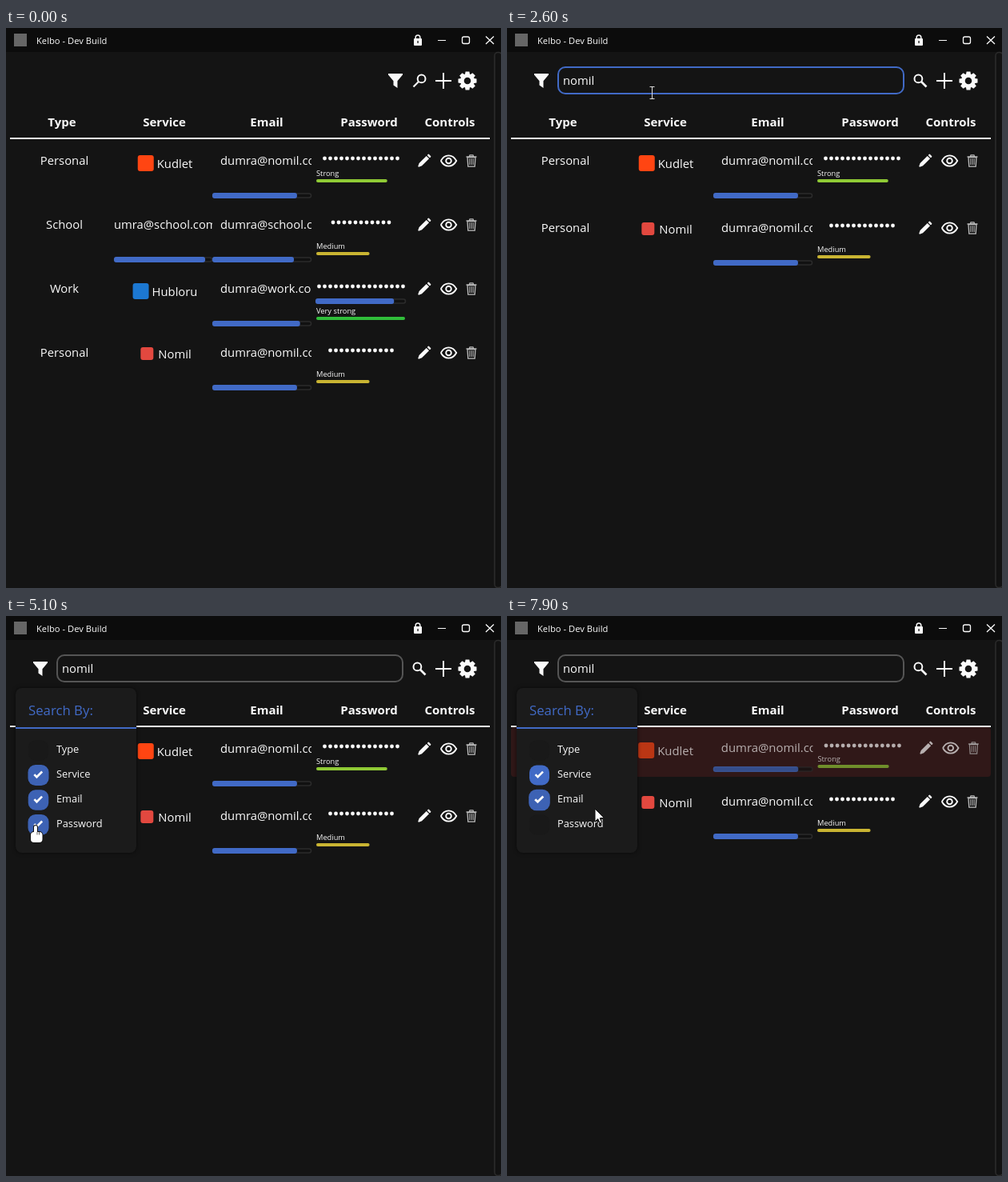
Animation, 619 px wide and 700 px high, one loop 8000 ms. Source, as an HTML page with a canvas:

```html
<!DOCTYPE html>
<html lang="en">
<head>
<meta charset="utf-8">
<title>Password manager</title>
<style>
html, body { margin: 0; width: 100%; height: 100%; overflow: hidden; background: #141414; }
canvas { display: block; }
</style>
</head>
<body>
<canvas id="stage" width="619" height="700"></canvas>
<script>
const ctx = document.getElementById('stage').getContext('2d');
const LOOP = 8000, STEP = 100;
const WHITE = '#fafafa', BLUE = '#416ac6', BG = '#141414';
const BODY = 14.8, PITCH = 7;
const QUERY = 'nomil';

const levels = {
  'Medium': { color: '#c9b432', share: 0.6 },
  'Strong': { color: '#8fca35', share: 0.8 },
  'Very strong': { color: '#30bd3a', share: 1 }
};
const rows = [
  { type: 'Personal', service: 'Kudlet', icon: '#ff4512', size: 20, mail: 'dumra@nomil.com', dots: 14, level: 'Strong', ly: 43 },
  { type: 'School', link: 'umra@school.com', mail: 'dumra@school.com', dots: 11, level: 'Medium', ly: 54 },
  { type: 'Work', service: 'Hubloru', icon: '#1c78d2', size: 20, mail: 'dumra@work.com', dots: 17, level: 'Very strong', ly: 55 },
  { type: 'Personal', service: 'Nomil', icon: '#e2483f', size: 16, mail: 'dumra@nomil.com', dots: 12, level: 'Medium', ly: 54 }
];
const filters = [
  { name: 'Type', off: 4400 },
  { name: 'Service' },
  { name: 'Email', off: 5450, on: 7400 },
  { name: 'Password', off: 5150 }
];

// each move eases to a point between two times; bow bends it downwards
const moves = [
  { from: 100, to: 400, x: 515, y: 65 },
  { from: 600, to: 1100, x: 181, y: 81, bow: 55 },
  { from: 2800, to: 3200, x: 43, y: 65 },
  { from: 3300, to: 3700, x: 41, y: 160 },
  { from: 3700, to: 4100, x: 40, y: 222 },
  { from: 4100, to: 4300, x: 40, y: 163 },
  { from: 4700, to: 5100, x: 37, y: 262 },
  { from: 5300, to: 5500, x: 40, y: 225 },
  { from: 5900, to: 6100, x: 67, y: 246 },
  { from: 6500, to: 7000, x: 225, y: 185 },
  { from: 7000, to: 7400, x: 41, y: 225 },
  { from: 7700, to: 7900, x: 110, y: 241 }
];

const clamp = v => Math.max(0, Math.min(1, v));
const ramp = (t, start, span) => clamp((t - start) / span);
const ease = p => p * p * (3 - 2 * p);

function pointer(t) {
  if (t < moves[0].from) return null;
  let x = 597, y = 107;
  for (const m of moves) {
    const p = ease(ramp(t, m.from, m.to - m.from));
    x += (m.x - x) * p;
    y += (m.y - y) * p + (m.bow || 0) * Math.sin(Math.PI * p);
    if (p < 1) break;
  }
  return { x, y };
}

function setFont(size, weight) {
  ctx.font = `${weight || (size < 12 ? 500 : 400)} ${size}px "Open Sans", "Noto Sans", sans-serif`;
}

function widthOf(s) {
  setFont(BODY);
  return ctx.measureText(s).width;
}

function text(s, x, cy, size = BODY, { weight, align = 'left', color = WHITE } = {}) {
  setFont(size, weight);
  ctx.textAlign = align;
  ctx.fillStyle = color;
  ctx.fillText(s, x, Math.round(cy + size * 0.36));
}

function paint(fill, stroke, lw = 1) {
  if (fill) { ctx.fillStyle = fill; ctx.fill(); }
  if (stroke) { ctx.strokeStyle = stroke; ctx.lineWidth = lw; ctx.stroke(); }
}

function box(x, y, w, h, r, fill, stroke, lw) {
  ctx.beginPath();
  ctx.roundRect(x, y, w, h, r);
  paint(fill, stroke, lw);
}

function circle(x, y, r, fill, stroke, lw) {
  ctx.beginPath();
  ctx.arc(x, y, r, 0, 7);
  paint(fill, stroke, lw);
}

function poly(points, fill, stroke, lw) {
  ctx.beginPath();
  points.forEach(([x, y]) => ctx.lineTo(x, y));
  ctx.closePath();
  paint(fill, stroke, lw);
}

function line(color, lw, ...points) {
  ctx.beginPath();
  points.forEach(([x, y]) => ctx.lineTo(x, y));
  paint(null, color, lw);
}

// the same half outline on both sides of the vertical axis
const mirror = half => [...half, ...half.map(([x, y]) => [-x, y]).reverse()];

function at(x, y, draw) {
  ctx.save();
  ctx.translate(x, y);
  draw();
  ctx.restore();
}

function clipped(x, y, w, h, draw) {
  ctx.save();
  ctx.beginPath();
  ctx.rect(x, y, w, h);
  ctx.clip();
  draw();
  ctx.restore();
}

function titleBar() {
  box(0, 0, 619, 30, 0, '#0c0c0c');
  box(10, 7, 16, 16, 0, '#666');
  text('Kelbo - Dev Build', 38, 15.5, 11.2);
  box(510, 13, 10, 9, 1, WHITE);
  box(512.2, 9, 5.6, 8, 2.8, null, WHITE, 1.5);
  box(514.4, 16, 1.3, 3, 0, '#111');
  line(WHITE, 1, [540, 15.5], [550, 15.5]);
  box(570.5, 11, 9, 8.5, 2, null, WHITE, 1.3);
  line(WHITE, 1.3, [600, 10.5], [610, 20]);
  line(WHITE, 1.3, [610, 10.5], [600, 20]);
}

function gear() {
  for (let i = 0; i < 8; i++) {
    poly(mirror([[3.2, -7], [2.4, -11.5]]), WHITE);
    ctx.rotate(Math.PI / 4);
  }
  circle(0, 0, 6.6, null, WHITE, 4.6);
}

function funnel() {
  poly([[-9, -9], [9, -9], [9, -7.6], [2.5, 0.3], [2.5, 9], [-2.5, 5.6], [-2.5, 0.3], [-9, -7.6]], WHITE);
}

function searchField(t, left) {
  const focused = t < 3300;
  box(left, 49, 496 - left, 33, 9, BG, focused ? BLUE : '#555', 2);
  const typed = QUERY.slice(0, Math.max(0, Math.floor((t - 1700) / 75)));
  text(typed, 70, 66);
  const idle = t - (t >= 2100 ? 2100 : t >= 1800 ? 1800 : 1000);
  if (focused && idle >= 0 && idle % 1000 < 500) {
    box(70 + Math.round(widthOf(typed)), 55, 1, 21, 0, WHITE);
  }
}

function toolbar(t) {
  const p = ease(ramp(t, 500, 500)), fx = 487 - 444 * p;
  at(fx, 66, funnel);
  if (p > 0.02) searchField(t, fx + 21);
  at(517, 66, () => {
    ctx.rotate((1 - p) * Math.PI / 2);
    circle(-2.6, -2.6, 4.9, null, WHITE, 2);
    line(WHITE, 2.2 + 0.5 * p, [1, 1], [7.5, 7.5]);
  });
  line(WHITE, 2, [537, 66], [557, 66]);
  line(WHITE, 2, [547, 56], [547, 76]);
  at(577, 66, gear);
}

function tableHead() {
  ['Type', 'Service', 'Email', 'Password'].forEach((name, i) =>
    text(name, 70 + 128 * i, 118, 15, { weight: 700, align: 'center' }));
  text('Controls', 555, 118, 15, { weight: 700, align: 'center' });
  box(5, 137, 600, 2, 0, WHITE);
}

function scrollBar(x, cy, w, content) {
  box(x + 0.5, cy - 2.5, w - 1, 5, 3, '#111', '#2b2b2b', 1.5);
  box(x, cy - 3.5, w * w / content, 7, 3, BLUE);
}

function pencil() {
  ctx.rotate(Math.PI / 4);
  box(-2.4, -10, 4.8, 2.6, 1, WHITE);
  poly(mirror([[2.4, -6.2], [2.4, 6.6], [0.6, 10.4]]), WHITE);
}

function eye() {
  ctx.beginPath();
  ctx.moveTo(-9.7, 0);
  ctx.bezierCurveTo(-5, -8.8, 5, -8.8, 9.7, 0);
  ctx.bezierCurveTo(5, 8.8, -5, 8.8, -9.7, 0);
  paint(null, WHITE, 1.9);
  circle(0, 0, 3.3, null, WHITE, 1.9);
}

function bin() {
  const gray = '#bdbdbd';
  line(gray, 1.3, [-6.5, -5], [6.5, -5]);
  box(-2.3, -7.2, 4.6, 2.2, 0.5, null, gray, 1.2);
  poly(mirror([[5, -4.5], [4.2, 7.2]]), null, gray, 1.3);
  for (const x of [-2.2, 0, 2.2]) line(gray, 1, [x, -2.8], [x, 5]);
}

function serviceCell(r, top, h, bar, lift) {
  if (r.link) {
    clipped(135, top, 123, h, () => text(r.link, 135, top + 27 - lift));
    scrollBar(135, bar, 123, widthOf(r.link) + 4);
    return;
  }
  const x = 199 - (widthOf(r.service) + 24) / 2, cy = top + 21 + r.size / 2 - lift;
  box(x + 10 - r.size / 2, cy - 1 - r.size / 2, r.size, r.size, 3, r.icon);
  text(r.service, x + 24, cy);
}

function passwordCell(r, top, h, lift) {
  const ly = top + Math.min(r.ly, h - 22), span = r.dots * PITCH, wide = span > 112;
  if (!wide || !lift) {
    clipped(388, top, 112, h, () => {
      const x = wide ? 388 : 444 - span / 2;
      for (let i = 0; i < r.dots; i++) circle(x + (i + 0.5) * PITCH, top + 24 - lift, 2.4, WHITE);
    });
  }
  if (wide) scrollBar(387, ly - 12.5, 113, span + 11);
  const { color, share } = levels[r.level];
  text(r.level, 388, ly, 9.3);
  box(388, ly + 7, 111 * share, 4, 2, color);
}

function drawRow(r, top, h, p, hovered) {
  const lift = p > 0 ? 1 : 0;
  if (lift) box(5, top, 600, h, 4, 'rgba(220,50,55,0.14)');
  else if (hovered) box(5, top, 600, h, 4, '#1a1a1a');
  clipped(5, top, 600, h, () => {
    if (lift) {
      ctx.globalAlpha = clamp(1 - 1.45 * p);
      ctx.translate(-1.5, 0);
      ctx.scale(1.005, 1);
    }
    const cy = top + 27 - lift, bar = top + Math.min(70.5, h - 9.5);
    text(r.type, 73, cy, BODY, { align: 'center' });
    serviceCell(r, top, h, bar, lift);
    clipped(268, top, 114, h, () => text(r.mail, 268, cy));
    scrollBar(258, bar, 124, widthOf(r.mail) + 13);
    passwordCell(r, top, h, lift);
    at(523, cy, pencil);
    at(553.5, cy, eye);
    at(582, cy, bin);
  });
}

function hiddenPart(i, t) {
  if (i === 3) return 0;
  if (i > 0) return ramp(t, 1700, 370);
  return ramp(t, 5600, 370) - ramp(t, 7615, 370);
}

function table(t, cur) {
  let top = 139;
  rows.forEach((r, i) => {
    const p = hiddenPart(i, t), h = Math.round(80 - 78 * p);
    const hovered = cur && cur.y > top && cur.y < top + h && cur.x > 163 && cur.x < 605;
    if (p < 1) drawRow(r, top, h, p, hovered);
    top += h;
  });
}

const boxY = i => 168 + 31 * i;
const overBox = (i, c) => c && c.x > 27 && c.x < 54 && Math.abs(c.y - boxY(i)) < 14;

// trailing average gives the hover growth its lag
function glow(i, t) {
  let sum = 0;
  for (let d = 0; d < 300; d += 50) if (overBox(i, pointer(t - d))) sum++;
  return sum / 6;
}

function checked({ off, on }, t) {
  return 1 - (off ? ramp(t, off, 250) : 0) + (on ? ramp(t, on, 250) : 0);
}

function panel(t) {
  const p = ease(ramp(t, 3200, 300));
  if (!p) return;
  ctx.save();
  ctx.globalAlpha = p;
  ctx.translate(0, -10 * (1 - p));
  ctx.shadowColor = 'rgba(0,0,0,0.6)';
  ctx.shadowBlur = 5;
  box(12, 90, 151, 206, 8, '#1b1b1b');
  ctx.shadowColor = 'transparent';
  text('Search By:', 28, 118, 16.8, { color: BLUE });
  box(12, 139, 151, 2, 0, BLUE);
  filters.forEach((f, i) => {
    const y = boxY(i), s = 1 + 0.13 * glow(i, t);
    text(f.name, 63, y - 1.5, 12.8);
    at(40.5, y, () => {
      ctx.scale(s, s);
      box(-12.5, -12.5, 25, 25, 9, '#191919');
      ctx.globalAlpha = p * checked(f, t);
      box(-12.5, -12.5, 25, 25, 9, s > 1 ? '#3d62b4' : BLUE);
      line(WHITE, 2.6, [-5, -0.8], [-2, 2.2], [4.5, -4.3]);
    });
  });
  ctx.restore();
}

function arrow() {
  poly([[0, 0], [0, 16], [3.7, 12.6], [6.2, 18], [8.6, 17], [6.2, 11.7], [11.2, 11.2]], '#fff', '#111', 1);
}

function hand() {
  for (const edge of ['#111', null]) {
    box(-2, 0, 4, 14, 2, '#fff', edge, 2);
    box(-6, 8, 14.5, 13, 4, '#fff', edge, 2);
  }
  for (const x of [2, 4.5]) line('#333', 0.8, [x, 8], [x, 11.5]);
}

function beam() {
  line('#ddd', 1, [0.5, -7], [0.5, 7]);
  for (const y of [-7.5, 7.5]) line('#ddd', 1, [-2.5, y], [3.5, y]);
}

function drawPointer(t, c) {
  if (!c) return;
  const onBar = c.y > 48 && c.y < 83;
  const inField = onBar && t > 800 && c.x > 63 && c.x < 497;
  const onIcon = onBar && (c.x > 478 || Math.abs(c.x - 43) < 10);
  const onBox = t > 3400 && filters.some((f, i) => overBox(i, c));
  at(c.x, c.y, inField ? beam : onIcon || onBox ? hand : arrow);
}

function render(now) {
  const t = Math.floor((now % LOOP) / STEP) * STEP;
  const cur = pointer(t);
  box(0, 0, 619, 700, 0, BG);
  titleBar();
  box(611, 30.5, 9, 669, 4, '#121212', '#2c2c2c', 1.5);
  toolbar(t);
  tableHead();
  table(t, cur);
  panel(t);
  drawPointer(t, cur);
}

let start = null;
function tick(now) {
  if (start === null) start = now;
  render(now - start);
  requestAnimationFrame(tick);
}
render(0);
requestAnimationFrame(tick);
</script>
</body>
</html>
```
